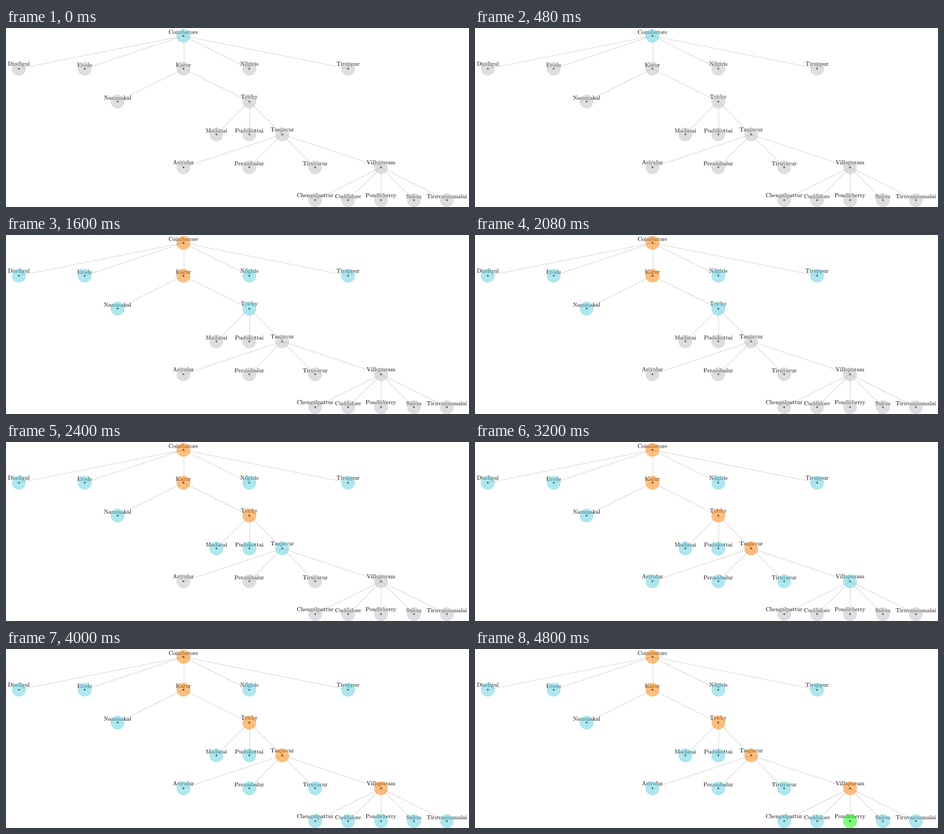
These frames come from a looping animation (831x322 px, 5.6 s). A matplotlib script:

```python
import matplotlib.pyplot as plt
from matplotlib.animation import FuncAnimation
from matplotlib.patches import Circle, PathPatch
from matplotlib.textpath import TextPath
from matplotlib.transforms import Affine2D

plt.rcParams["mathtext.fontset"] = "cm"

W, H, DPI = 831, 322, 72      # at 72 dpi one point is one pixel
X0, Y0, STEP = 23.0, 14.15, 59.1
RADIUS, DOT = 11.8, 1.55
FONT, PAD = 10.38, 3.46

GRAY, BLUE, ORANGE, GREEN = "#bfbfbf", "#60d0e0", "#ff8000", "#00ff00"

# name: (column, row, parent)
TREE = {
    "Coimbatore": (5, 0, None),
    "Dindigul": (0, 1, "Coimbatore"),
    "Erode": (2, 1, "Coimbatore"),
    "Karur": (5, 1, "Coimbatore"),
    "Nilgiris": (7, 1, "Coimbatore"),
    "Tiruppur": (10, 1, "Coimbatore"),
    "Nammakal": (3, 2, "Karur"),
    "Trichy": (7, 2, "Karur"),
    "Madurai": (6, 3, "Trichy"),
    "Pudukottai": (7, 3, "Trichy"),
    "Tanjavur": (8, 3, "Trichy"),
    "Ariyalur": (5, 4, "Tanjavur"),
    "Perambalur": (7, 4, "Tanjavur"),
    "Tiruvarur": (9, 4, "Tanjavur"),
    "Villupuram": (11, 4, "Tanjavur"),
    "Chengalpattur": (9, 5, "Villupuram"),
    "Cuddalore": (10, 5, "Villupuram"),
    "Pondicherry": (11, 5, "Villupuram"),
    "Salem": (12, 5, "Villupuram"),
    "Tiruvannamalai": (13, 5, "Villupuram"),
}
ROUTE = ["Coimbatore", "Karur", "Trichy", "Tanjavur", "Villupuram"]
GOAL = "Pondicherry"

fig = plt.figure(figsize=(W / DPI, H / DPI), dpi=DPI, facecolor="white")
ax = fig.add_axes([0, 0, 1, 1])
ax.set(xlim=(0, W), ylim=(H, 0))
ax.axis("off")


def place(name):
    col, row, _ = TREE[name]
    return X0 + col * STEP, Y0 + row * STEP


def add_edge(name, parent):
    (x1, y1), (x2, y2) = place(parent), place(name)
    ax.plot([x1, x2], [y1, y2], color="#333333", lw=0.8,
            ls=(0, (0.75, 2.35)), dash_capstyle="butt", zorder=1)


def add_label(name):
    """Centre the name over its node, with descenders resting on the same line."""
    x, y = place(name)
    path = TextPath((0, 0), rf"$\mathrm{{{name}}}$", size=FONT)
    box = path.get_extents()
    depth = 0.194 * FONT if set(name) & set("gjpqy") else 0
    move = Affine2D().scale(1, -1).translate(
        x - (box.x0 + box.x1) / 2, y - PAD - depth)
    ax.add_patch(PathPatch(move.transform_path(path), fc="black", lw=0, zorder=2))


def add_disc(name):
    disc = Circle(place(name), RADIUS, alpha=0.5, lw=0.8, zorder=3)
    return ax.add_patch(disc)


for name, (_, _, parent) in TREE.items():
    if parent:
        add_edge(name, parent)
    add_label(name)
    ax.add_patch(Circle(place(name), DOT, fc="black", lw=0, zorder=2))
discs = {name: add_disc(name) for name in TREE}


def node_color(name, step):
    visited = ROUTE[:step]
    if name == GOAL and step > len(ROUTE):
        return GREEN
    if name in visited:
        return ORANGE
    parent = TREE[name][2]
    return BLUE if parent is None or parent in visited else GRAY


def update(step):
    for name, disc in discs.items():
        disc.set_color(node_color(name, step))
    return list(discs.values())


anim = FuncAnimation(fig, update, frames=len(ROUTE) + 2, interval=800,
                     repeat=True, repeat_delay=0, blit=False)
plt.show()
```
